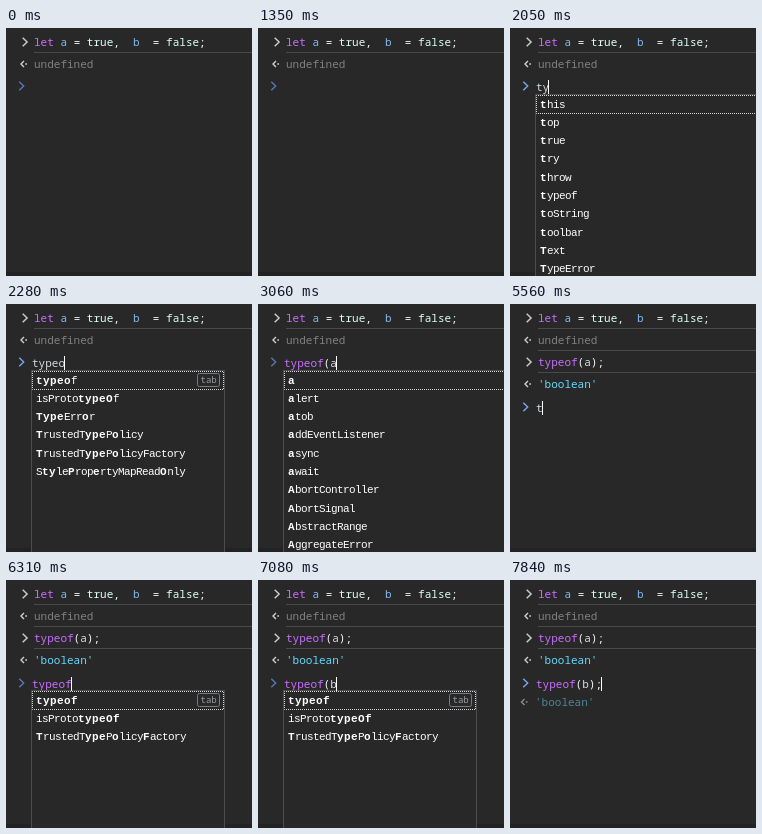
These frames come from a looping animation (246x248 px, 8000 ms). An HTML page:

```html
<!DOCTYPE html>
<html lang="en">
<head>
<meta charset="utf-8">
<title>Console typing</title>
<style>
html, body { margin: 0; width: 100%; height: 100%; overflow: hidden; background: #282828; }
svg { display: block; width: 246px; height: 248px; }
text { font: 500 11px "Noto Sans Mono", "DejaVu Sans Mono", monospace; white-space: pre; fill: #f4f8fa; }
.key { fill: #cb6cff; }
.def { fill: #7fbaf0; }
.atom { fill: #dcfff6; }
.var { fill: #d3dae0; font-weight: 400; }
.str { fill: #64d9fb; }
.dim { fill: #808080; font-weight: 400; }
.eager { fill: #4a8797; font-weight: 400; }
.item { font-family: "Liberation Mono", monospace; font-weight: 400; letter-spacing: -.6px; fill: #fff; }
.item .hit { font-weight: bold; letter-spacing: .4px; }
.tab { font-size: 9px; font-weight: 400; fill: #979ca4; }
.rule { fill: #4a4a4a; }
.strip { fill: #222; }
.caret { fill: #fff; }
.icon { fill: none; stroke: #d0d0d0; stroke-width: 1.4; }
.prompt { stroke: #5878b4; }
.prompt.lit { stroke: #7ba6ee; }
.faint { stroke: #8a8a8a; }
.box { fill: #282828; stroke: #4c4c4c; }
.focus { fill: none; stroke: #d8d8d8; stroke-dasharray: 1; stroke-dashoffset: .5; }
.badge { fill: none; stroke: #777b82; }
</style>
</head>
<body>
<svg viewBox="0 0 246 248" id="stage"></svg>
<script>
const LOOP = 8000, CHAR = 6.6, ROW = 18.3;

const typeWords = ['typeof', 'isPrototypeOf', 'TypeError', 'TrustedTypePolicy',
  'TrustedTypePolicyFactory', 'StylePropertyMapReadOnly', 'StylePropertyMap'];
const words = {
  t: ['this', 'top', 'true', 'try', 'throw', 'typeof', 'toString', 'toolbar', 'Text', 'TypeError'],
  a: ['a', 'alert', 'atob', 'addEventListener', 'async', 'await',
    'AbortController', 'AbortSignal', 'AbstractRange', 'AggregateError'],
  b: ['b', 'blur', 'btoa', 'break', 'Blob', 'BigInt', 'Boolean', 'BarProp']
};

// [time, typed text, completion query, eager result]
const steps = [
  [0, '', ''],
  [1570, 't', ''], [1680, 't', 't'],
  [2050, 'ty', 't'], [2100, 'ty', 'ty'], [2160, 'typ', 'typ'], [2220, 'type', 'type'],
  [2280, 'typeo', 'typeo'], [2350, 'typeof', 'typeo'], [2410, 'typeof', 'typeof'],
  [2750, 'typeof(', 'typeof'],
  [2980, 'typeof(a', 'typeof'], [3060, 'typeof(a', 'a'],
  [3350, 'typeof(a)', ''], [3400, 'typeof(a)', '', true],
  [3810, 'typeof(a);', '', true],
  [4450, '', ''],
  [5560, 't', ''], [5700, 't', 't'],
  [5910, 'ty', 't'], [5970, 'ty', 'ty'], [6030, 'typ', 'typ'],
  [6210, 'type', 'type'], [6260, 'typeo', 'typeo'], [6310, 'typeof', 'typeof'],
  [6680, 'typeof(', 'typeof'],
  [7080, 'typeof(b', 'typeof'], [7130, 'typeof(b', 'b'],
  [7460, 'typeof(b)', ''], [7500, 'typeof(b)', '', true],
  [7840, 'typeof(b);', '', true]
];

const span = (cls, s) => `<tspan class="${cls}">${s}</tspan>`;
const text = (x, y, s, cls = '') => `<text x="${x}" y="${y}" class="${cls}">${s}</text>`;
const rect = (cls, x, y, w, h, r = 0) =>
  `<rect class="${cls}" x="${x}" y="${y}" width="${w}" height="${h}" rx="${r}"/>`;
const chevron = (x, y, cls = '') =>
  `<path class="icon ${cls}" d="M${x} ${y - 4.2}l4.4 4.2l-4.4 4.2"/>`;
const reply = (x, y, cls = '') =>
  `<path class="icon ${cls}" d="M${x + 3.5} ${y - 3}l-3 3l3 3M${x + 4.8} ${y}h1.7"/>`;
const rule = y => rect('rule', 28, y, 218, 1);

const paint = s => s.startsWith('typeof')
  ? s.replace(/\((\w)/, (m, v) => '(' + span('var', v)).replace('typeof', span('key', 'typeof'))
  : span('var', s);

// Positions of the matched letters: one run if possible, else first fit.
function hits(word, query) {
  const low = word.toLowerCase(), at = low.indexOf(query);
  if (at >= 0) return [...query].map((c, i) => at + i);
  const found = [];
  [...low].forEach((c, i) => { if (c === query[found.length]) found.push(i); });
  return found.length === query.length ? found : null;
}

function popup(query, top) {
  const list = (words[query] || typeWords).filter(w => hits(w, query));
  const wide = query.length === 1, width = wide ? 260 : 193;
  let out = rect('box', 25.5, top + .5, width, 220) +
    rect('focus', 26.5, top + 1.5, width - 2, 18);
  list.forEach((word, i) => {
    const on = hits(word, query);
    const label = [...word].map((c, k) => on.includes(k) ? span('hit', c) : c).join('')
      .replace(/<\/tspan><tspan class="hit">/g, '');
    out += text(30, Math.round(top + 13.5 + i * ROW), label, 'item');
  });
  if (!wide) out += rect('badge', 191.5, top + 3.5, 22, 13, 2) + text(194.5, top + 13, 'tab', 'tab');
  return out;
}

const first = chevron(16.7, 14) +
  text(28, 18, `${span('key', 'let')} ${span('def', 'a')} = ${span('atom', 'true')},  ` +
    `${span('def', 'b')}  = ${span('atom', 'false')};`) +
  rule(24) + reply(14.5, 36) + text(28, 40, 'undefined', 'dim');

const second = rule(46) + chevron(16.7, 58) + text(28, 62, paint('typeof(a);')) +
  rule(68) + reply(14.5, 80) + text(28, 84, "'boolean'", 'str');

const caretOn = t => t >= 810 && !(t >= 1350 && t < 1570) && !(t >= 5030 && t < 5560);

// The prompt lights up when the line could be run as it stands.
const complete = s => /^(t|ty|typ|type|typeo|typeof\(\w\);?)$/.test(s);

function scene(t) {
  const [, typed, query, eager] = steps.filter(s => s[0] <= t).pop();
  const later = t >= 4450, y = later ? 45 : 0;
  let out = rect('strip', 0, 244, 246, 4) + first;
  if (later) out += second;
  out += chevron(13.3, y + 58, complete(typed) ? 'prompt lit' : 'prompt') +
    text(26, y + 63, paint(typed));
  if (eager) out += reply(11, y + 77, 'faint') + text(25, y + 81, "'boolean'", 'eager');
  if (query) out += popup(query, later ? 110 : 66);
  if (caretOn(t)) out += rect('caret', Math.round(25 + typed.length * CHAR), y + 52, 1, 14);
  return out;
}

const stage = document.getElementById('stage');
const start = performance.now();
let last = '';

function draw() {
  const next = scene((performance.now() - start) % LOOP);
  if (next !== last) stage.innerHTML = last = next;
  requestAnimationFrame(draw);
}
draw();
</script>
</body>
</html>
```
